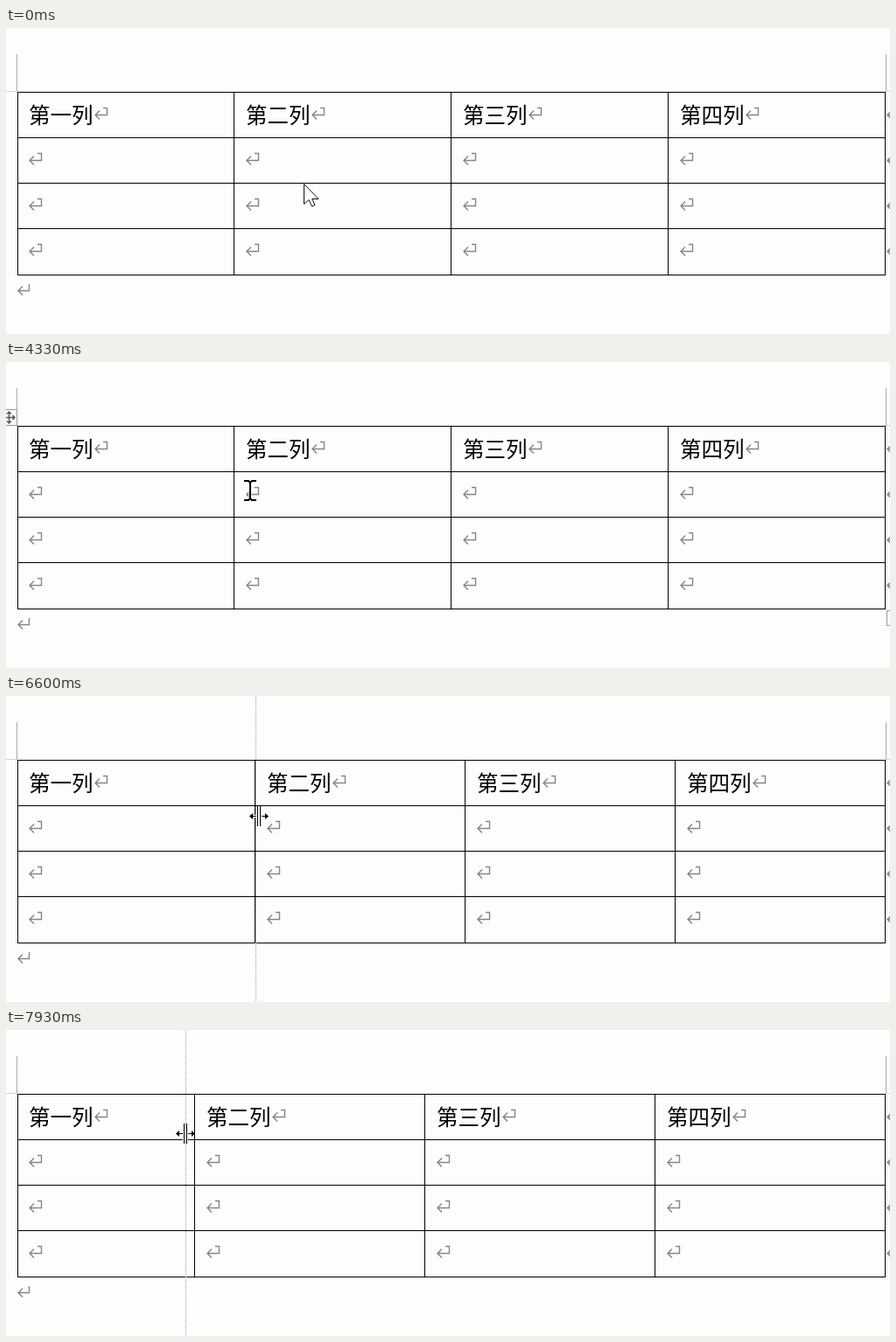
Write an HTML page that moves like this. It is 1010 px wide and 350 px high and loops after 8000 ms.

```html
<!DOCTYPE html>
<html lang="zh-CN">
<head>
<meta charset="utf-8">
<title>表格列宽</title>
<style>
  html, body { margin: 0; width: 100%; height: 100%; overflow: hidden; background: #fdfdfc; }
  svg { display: block; width: 1010px; height: 350px; }
  text { font: 300 24.5px "Noto Sans CJK SC", "Noto Sans CJK", sans-serif; fill: #000; }
  path { fill: none; }
  .rule { stroke: #000; shape-rendering: crispEdges; }
  .crop { stroke: #a8a8a8; shape-rendering: crispEdges; }
  .mark { stroke: #868686; stroke-width: 1.4; }
  .guide { stroke: #a0a0a0; stroke-dasharray: 1 1; shape-rendering: crispEdges; }
  .grip { fill: #fdfdfc; stroke: #989898; }
  .halo { stroke: #fdfdfc; stroke-width: 3; }
  .ink { stroke: #000; }
</style>
</head>
<body>
<svg viewBox="0 0 1010 350">
  <defs>
    <path id="cellMark" class="mark" d="M10-6.5H14.5V1.5H1M6-3.5L1 1.5L6 6.5"/>
    <path id="lineMark" class="mark" d="M13.5-6V1.5H1M6-3.5L1 1.5L6 6.5"/>
    <path id="beam" d="M-7-11H-2L0-9L2-11H7M0-9V9M-7 11H-2L0 9L2 11H7"/>
    <path id="split" d="M-1.5-11V12M1.5-11V12M-3 .5H-10M3 .5H10"/>
  </defs>

  <path class="crop" d="M12.5 30V72M1005.5 30V72"/>
  <path class="crop" stroke-dasharray="1 1" d="M0 72.5H13M1005 72.5H1010"/>

  <path id="rules" class="rule"/>
  <g id="columns"></g>
  <g id="rowEnds"></g>
  <use href="#lineMark" x="13" y="299"/>

  <g id="grips">
    <rect class="grip" x="-5.5" y="54.5" width="18" height="18"/>
    <path stroke="#555" stroke-width="1.4"
      d="M3.5 57V70M-3 63.5H10M1 59.5L3.5 57L6 59.5M1 67.5L3.5 70L6 67.5M7.5 61L10 63.5L7.5 66"/>
    <rect class="grip" x="1006.5" y="284.5" width="17" height="17"/>
  </g>

  <path id="guide" class="guide" d="M.5 0V350"/>

  <g id="arrow">
    <path d="M.5.5V23.5L6 18.5L9.5 26L13 24.5L9.7 17.5H17Z" style="fill:#fdfdfc" stroke="#111"/>
  </g>
  <g id="text">
    <use href="#beam" class="halo"/>
    <use href="#beam" class="ink" stroke-width="2"/>
  </g>
  <g id="resize">
    <use href="#split" class="halo"/>
    <use href="#split" class="ink"/>
    <path d="M-11 .5L-7-3V4ZM11 .5L7-3V4Z" style="fill:#000"/>
  </g>
</svg>

<script>
const LOOP = 8000, TICK = 200 / 3;
const LEFT = 13, RIGHT = 1004, TOP = 73, ROW_HEIGHT = 52.25;
const TITLES = ['第一列', '第二列', '第三列', '第四列'];
const ENTER_TABLE = 57, ON_BORDER = 68, DRAG_START = 79;

// Turning points of the pointer: tick, x, y
const PATH = [
  [0, 340, 178], [13, 331, 229], [17, 293, 211], [24, 293, 211], [27, 289, 210],
  [38, 255, 150], [44, 255, 150], [50, 249, 85], [65, 279, 147], [69, 260, 142],
  [DRAG_START, 260, 142], [94, 350, 141], [97, 282, 138], [105, 331, 132], [124, 181, 115]
];

const $ = id => document.getElementById(id);
const move = (el, x, y) => el.setAttribute('transform', `translate(${x} ${y})`);
const show = (el, on) => el.setAttribute('visibility', on ? 'visible' : 'hidden');
const perRow = make => [0, 1, 2, 3].map(row => make(row, 98 + 52 * row)).join('');
const useMark = (id, x, y) => `<use href="#${id}" x="${x}" y="${y}"/>`;

$('columns').innerHTML = TITLES.map(title =>
  `<g><text x="14" y="109">${title}</text>` +
  perRow((row, y) => useMark('cellMark', row ? 14 : 89, y)) + '</g>'
).join('');
$('rowEnds').innerHTML = perRow((row, y) => useMark('lineMark', RIGHT + 2, y));

const columns = [...$('columns').children];
const pointers = ['arrow', 'text', 'resize'].map($);

// Ticks begin on whole hundredths of a second.
function tickAt(t) {
  const n = Math.floor(t / TICK + 0.1);
  return Math.round(n * TICK / 10) * 10 > t ? n - 1 : n;
}

function pointerAt(n) {
  const i = PATH.findIndex(key => key[0] > n);
  const a = PATH[i - 1], b = PATH[i];
  const ease = (1 - Math.cos(Math.PI * (n - a[0]) / (b[0] - a[0]))) / 2;
  return [1, 2].map(j => Math.round(a[j] + (b[j] - a[j]) * ease));
}

function drawTable(edge) {
  const width = (RIGHT - edge) / 3;
  const inner = [0, 1, 2].map(i => Math.floor(edge + i * width));
  const across = [0, 1, 2, 3, 4].map(i =>
    `M${LEFT} ${Math.floor(TOP + i * ROW_HEIGHT) + .5}H${RIGHT + 1}`);
  const down = [LEFT, ...inner, RIGHT].map(x => `M${x + .5} ${TOP}V283`);
  $('rules').setAttribute('d', across.concat(down).join(''));
  [LEFT - 1, ...inner].forEach((x, i) => move(columns[i], x, 0));
}

function draw(t) {
  const n = tickAt(t);
  const [x, y] = pointerAt(n);
  const trail = lag => pointerAt(Math.max(n - lag, DRAG_START))[0];
  const kind = n < ENTER_TABLE ? 0 : n < ON_BORDER ? 1 : 2;

  pointers.forEach((p, i) => {
    show(p, i === kind);
    move(p, x, y);
  });
  show($('grips'), n >= ENTER_TABLE && n < DRAG_START);

  // The table follows one tick behind; the guide starts late and catches up.
  drawTable(trail(1));
  show($('guide'), n >= DRAG_START);
  move($('guide'), trail(Math.min(2, Math.max(0, (103 - n) / 6))), 0);
}

const start = performance.now();
function loop() {
  draw((performance.now() - start) % LOOP);
  requestAnimationFrame(loop);
}
loop();
</script>
</body>
</html>
```
